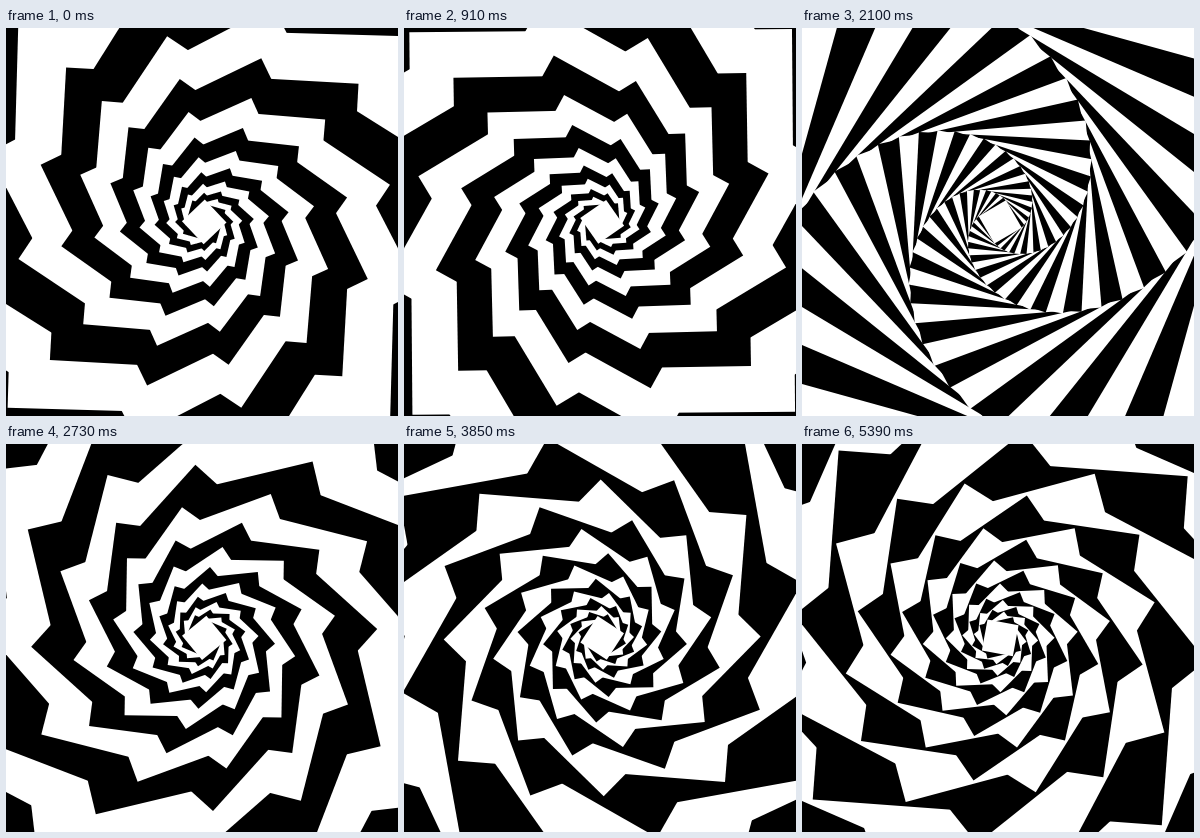
Recreate the animation shown at these times as an HTML page with a canvas. Size 392 by 388 pixels, loop 5460 ms.

```html
<!DOCTYPE html>
<html>
<head>
<meta charset="utf-8">
<style>
  html, body { margin: 0; height: 100%; overflow: hidden; background: #000; }
  canvas { display: block; }
</style>
</head>
<body>
<canvas id="stage" width="392" height="388"></canvas>
<script>
const ctx = document.getElementById('stage').getContext('2d');
const STEP_MS = 70, STEPS = 78;
const SQUARES = 32, SIDE = 500, SHRINK = 0.9147;
const FIRST_TWIST = 30.53, TICK = 0.715; // degrees

// The twist moves three ticks per step, plus extra ticks that come in ever faster up to a limit.
function twistAt(step) {
  const extra = Math.min(11, Math.round(step * (117 + step) / 1110));
  return FIRST_TWIST + TICK * (3 * step + extra);
}

// Each square is turned and shrunk relative to the one around it.
function draw(twist) {
  ctx.setTransform(1, 0, 0, 1, 198.2, 193.9);
  for (let n = 0; n < SQUARES; n++) {
    ctx.fillStyle = n % 2 ? '#fff' : '#000';
    ctx.fillRect(-SIDE / 2, -SIDE / 2, SIDE, SIDE);
    ctx.rotate(twist * Math.PI / 180);
    ctx.scale(SHRINK, SHRINK);
  }
}

const start = performance.now();
function frame() {
  const elapsed = performance.now() - start;
  draw(twistAt(Math.floor(elapsed / STEP_MS) % STEPS));
  requestAnimationFrame(frame);
}
frame();
</script>
</body>
</html>
```
